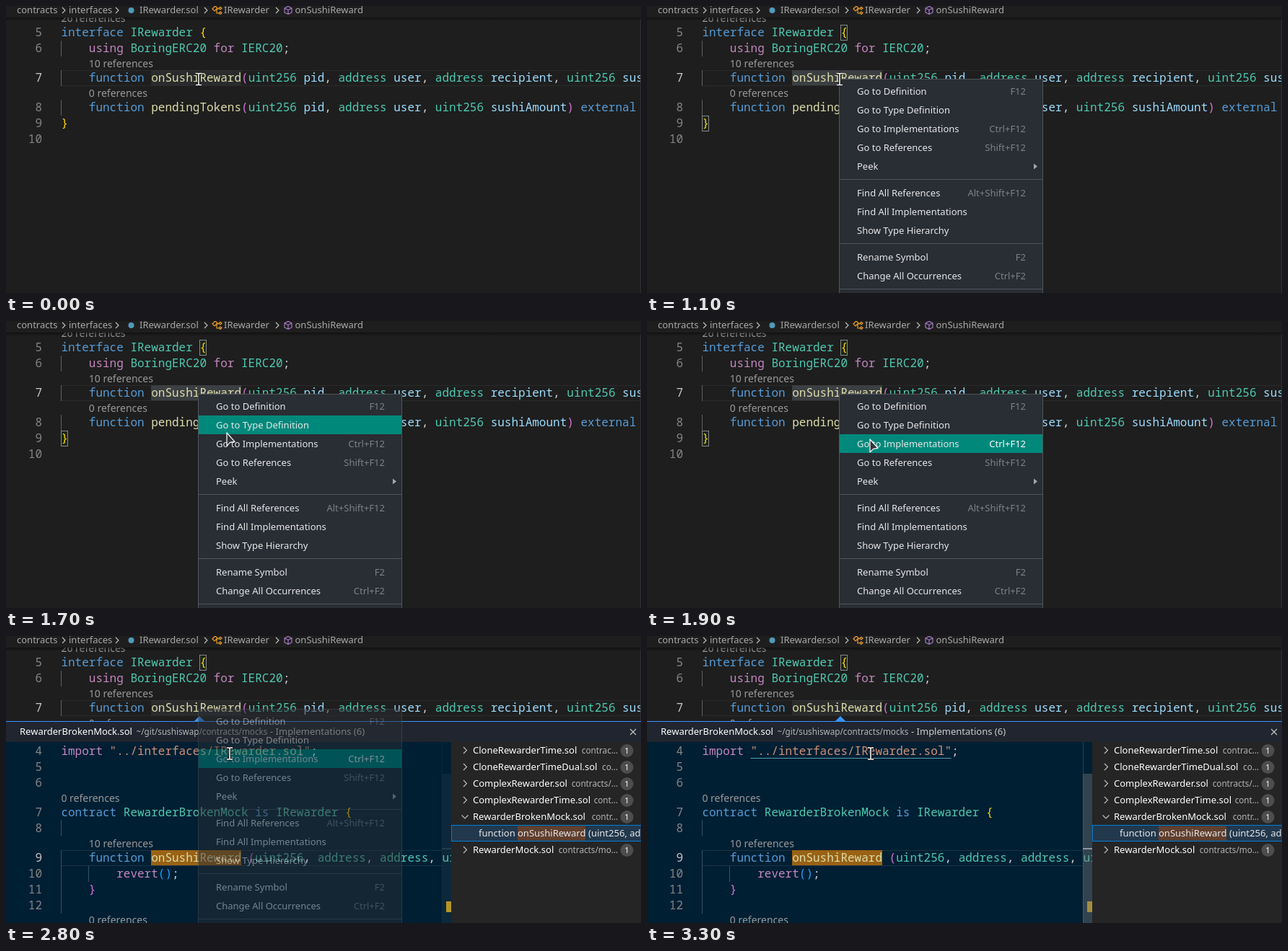
An HTML page that plays this animation: 880 by 398 pixels, repeating every 6 s.

```html
<!DOCTYPE html>
<html lang="en">
<head>
<meta charset="utf-8">
<title>Go to Implementations</title>
<style>
  html, body { margin: 0; width: 100%; height: 100%; overflow: hidden; background: #1e1e1e; }
  svg { display: block; width: 880px; height: 398px; }
  text { white-space: pre; font: 13px "Noto Sans", sans-serif; fill: #ccc; }
  .code { font: 16px "Noto Sans Mono", monospace; fill: #d4d4d4; }
  .num { text-anchor: end; fill: #858585; }
  .on { fill: #c6c6c6; }
  .lens { font-size: 14px; fill: #999; }
  .crumb { fill: #a9a9a9; }
  .small { font-size: 11.7px; fill: #b4b4b4; }
  .end { text-anchor: end; }
  .key { text-anchor: end; fill: #7f8387; }
  .item { fill: #e6e7e8; }
  .white { fill: #fff; }
  .badge { font-size: 11px; text-anchor: middle; fill: #fff; }
  .k { fill: #569cd6; } .t { fill: #4ec9b0; } .f { fill: #dcdcaa; } .v { fill: #9cdcfe; }
  .c { fill: #c586c0; } .s { fill: #ce9178; } .y { fill: #ffd700; } .p { fill: #da70d6; } .b { fill: #179fff; }
  .line { fill: none; stroke: #c5c5c5; stroke-width: 1.1; }
</style>
</head>
<body>
<svg id="stage" viewBox="0 0 880 398" xmlns="http://www.w3.org/2000/svg"></svg>
<script>
const CHAR = 9.6, LEFT = 76.4;

const rect = (x, y, w, h, fill, extra = '') =>
  `<rect x="${x}" y="${y}" width="${w}" height="${h}" fill="${fill}" ${extra}/>`;
const text = (x, y, cls, str) => `<text x="${x}" y="${y}" class="${cls}">${str}</text>`;
const path = (d, extra = 'class="line"') => `<path d="${d}" ${extra}/>`;
const chevron = (x, y, r = 4) => path(`M${x} ${y - r}l${r} ${r}l${-r} ${r}`);

// Tokens come as "class|text|class|text"; col is the indent in characters.
function code(num, y, col = 0, tokens = '', active = false) {
  const parts = tokens.split('|');
  let spans = '';
  for (let i = 0; i + 1 < parts.length; i += 2)
    spans += `<tspan class="${parts[i]}">${parts[i + 1]}</tspan>`;
  return text(50, y, 'code num' + (active ? ' on' : ''), num) +
    text(LEFT + col * CHAR, y, 'code', spans);
}
const lens = (y, str, col = 4) => text(LEFT + col * CHAR, y, 'lens', str);
const guide = (col, y, fill, h = 22) => rect(Math.floor(LEFT + col * CHAR), y, 1, h, fill);
const currentLine = (y, w, fill) => rect(76, y, w, 1, fill) + rect(76, y + 21, w, 1, fill);
const bracketBox = (id, x, y) =>
  `<rect id="${id}" x="${x}" y="${y}" width="9" height="21" fill="#1c251c" stroke="#888"/>`;

function breadcrumbs() {
  const cube = 'M391 .5l5 2.5v6l-5 2.5l-5-2.5v-6zM386 3l5 2.5l5-2.5M391 5.5v6';
  const shape = 'M286 4l4-4l3 3l-4 4zM291 4h4M292 4v6h3M295 3l2-1.5l2 1.5l-2 2zM295 9.5l2-1.5l2 1.5l-2 2z';
  return rect(0, 0, 880, 16, '#1e1e1e') +
    rect(0, 16, 880, 5, 'url(#shade)') +
    text(15, 10, 'crumb', 'contracts') + chevron(78, 6) +
    text(87, 10, 'crumb', 'interfaces') + chevron(152, 6) +
    '<circle cx="173.5" cy="6" r="4" fill="#519aba"/>' +
    text(185, 10, 'crumb', 'IRewarder.sol') + chevron(275, 6) +
    path(shape, 'fill="none" stroke="#ee9d28" stroke-width="1.2"') +
    text(302, 10, 'crumb', 'IRewarder') + chevron(374, 6) +
    path(cube, 'fill="none" stroke="#b180d7" stroke-width="1.1"') +
    text(400.5, 10, 'crumb', 'onSushiReward');
}

function editor() {
  const arg = (type, name) => `t|${type}|v| ${name}|x|, |`;
  const shared = arg('uint256', 'pid') + arg('address', 'user');
  return rect(0, 0, 880, 398, '#1e1e1e') +
    currentLine(89, 804, '#2b2b2b') +
    [48, 89, 130].map(y => guide(0, y, '#606060')).join('') +
    rect(201, 89, 125, 21, '#3c3f42', 'id="word"') +
    bracketBox('open', 268.5, 26.5) + bracketBox('close', 76.5, 152.5) +
    rect(268, 89, 10, 21, '#aeafad', 'id="block"') +
    lens(22, '26 references', 0) +
    code(5, 42, 0, 'k|interface |t|IRewarder |y|{') +
    code(6, 64, 4, 'c|using |t|BoringERC20 |c|for |t|IERC20|x|;') +
    lens(85, '10 references') +
    code(7, 105, 4, 'k|function |f|onSushiReward|p|(|' + shared +
      arg('address', 'recipient') + 't|uint256|v| sushiAmount', true) +
    text(LEFT + 20 * CHAR, 105, 'code', '<tspan id="blockChar" fill="#7a7a72">R</tspan>') +
    lens(126, '0 references') +
    code(8, 146, 4, 'k|function |f|pendingTokens|p|(|' + shared +
      't|uint256|v| sushiAmount|p|) |k|external') +
    code(9, 168, 0, 'y|}') + code(10, 190) +
    rect(879, 16, 1, 382, '#303030');
}

function results() {
  const rows = [
    ['CloneRewarderTime.sol', 'contrac…'], ['CloneRewarderTimeDual.sol', 'co…'],
    ['ComplexRewarder.sol', 'contracts/…'], ['ComplexRewarderTime.sol', 'cont…'],
    ['RewarderBrokenMock.sol', 'contr…'], null, ['RewarderMock.sol', 'contracts/mo…']
  ];
  return rect(617, 147, 263, 251, '#252526') + rows.map((row, i) => {
    const y = 158.5 + 23 * i;
    if (!row) return rect(617.5, y - 11, 264, 22, '#22384d', 'stroke="#007fd4"') +
      rect(709, y - 10, 94, 20, '#613f2e') +
      text(655, y + 4.5, 'item', 'function') + text(709, y + 4.5, 'item', 'onSushiReward') +
      text(807, y + 4.5, 'item', '(uint256, address)');
    const arrow = i === 4 ? path(`M631.5 ${y - 2}l4.5 4.5l4.5-4.5`) : chevron(634, y, 4.5);
    return arrow + text(647, y + 4.5, 'white', row[0]) + text(848, y + 4.5, 'small end', row[1]) +
      `<circle cx="860.5" cy="${y + .5}" r="9" fill="#4d4d4d"/>` + text(860.5, y + 4.5, 'badge', 1);
  }).join('');
}

function peek() {
  const dim = '#38505f';
  return path('M261 118l7-7l7 7z', 'fill="#3794ff"') +
    rect(0, 118, 880, 280, '#20252f') + rect(0, 118, 880, 1, '#3794ff') +
    text(19, 137, 'white', 'RewarderBrokenMock.sol') +
    text(180.5, 137, 'small', '~/git/sushiswap/contracts/mocks') +
    text(366, 137, '', '- Implementations (6)') +
    path('M865 129l8 8M873 129l-8 8') +
    rect(0, 147, 617, 251, '#001f33') +
    '<g clip-path="url(#peekClip)">' +
    currentLine(297, 528, '#1c3445') +
    [255, 297, 319, 341, 363].map(y => guide(0, y, dim)).join('') + guide(4, 319, dim) +
    rect(201, 297, 125, 21, '#996214') +
    code(4, 165, 0, 'c|import |s|"../interfaces/IRewarder.sol"|x|;') +
    rect(143.6, 169, 278, 1, '#4e9fb0', 'id="underline"') +
    code(5, 187) + code(6, 209) +
    lens(230, '0 references', 0) +
    code(7, 250, 0, 'k|contract |t|RewarderBrokenMock |k|is |t|IRewarder |y|{') +
    code(8, 272) +
    lens(293, '10 references') +
    code(9, 313, 4, 'k|function |f|onSushiReward |p|(|t|uint256|x|, |t|address|x|, |t|address|x|, |t|uint256', true) +
    code(10, 335, 8, 'c|revert|b|()|x|;') +
    code(11, 357, 4, 'p|}') + code(12, 379) +
    lens(399, '0 references') +
    rect(610, 368, 7, 15, '#bf9a1c') +
    '<g id="scroll">' + rect(604, 147, 1, 251, '#26404f') + rect(604, 191, 13, 207, '#79797966') +
    rect(604, 294, 13, 2, '#8d979d') + '</g></g>' +
    results();
}

const ROWS = [
  [118, 'Go to Definition', 'F12'], [144, 'Go to Type Definition', ''],
  [170, 'Go to Implementations', 'Ctrl+F12'], [196, 'Go to References', 'Shift+F12'],
  [222, 'Peek', ''], [259, 'Find All References', 'Alt+Shift+F12'],
  [285, 'Find All Implementations', ''], [311, 'Show Type Hierarchy', ''],
  [348, 'Rename Symbol', 'F2'], [374, 'Change All Occurrences', 'Ctrl+F2']
];

function menu() {
  return rect(266.5, 101.5, 282, 320, '#292d34', 'stroke="#50555b"') +
    rect(267, 105, 281, 26, '#00897b', 'id="hover"') +
    [240, 329, 392].map(y => rect(267, y, 281, 1, '#50555b')).join('') +
    ROWS.map(([y, label, key]) =>
      text(291, y + 4.5, 'item', label) + text(525, y + 4.5, 'key', key)).join('') +
    path('M536 218.5l5 4l-5 4z', 'fill="#a5a8ab"');
}

function pointers() {
  const beam = 'M-4-8h3q1 0 1 1v14q0 1-1 1h-3M4-8h-3q-1 0-1 1M4 8h-3q-1 0-1-1';
  return '<g id="beam" fill="none">' + path(beam, 'stroke="#111" stroke-width="3.4"') +
    path(beam, 'stroke="#fff" stroke-width="1.5"') + '</g>' +
    path('M0 0V18L4.6 13.4L11 12.4Z',
      'id="arrow" fill="#31363b" stroke="#fff" stroke-width="1.2" stroke-linejoin="round"');
}

const stage = document.getElementById('stage');
stage.innerHTML =
  `<defs><linearGradient id="shade" x2="0" y2="1"><stop stop-color="#000" stop-opacity=".45"/>
   <stop offset="1" stop-color="#000" stop-opacity="0"/></linearGradient>
   <clipPath id="peekClip"><rect y="147" width="617" height="251"/></clipPath></defs>` +
  editor() + breadcrumbs() + `<g id="peek">${peek()}</g><g id="menu">${menu()}</g>` + pointers();

const el = id => document.getElementById(id);
const fade = (id, amount) => el(id).setAttribute('opacity', Number(amount));
const move = (id, x, y) => el(id).setAttribute('transform', `translate(${x} ${y})`);
const keys = [...stage.querySelectorAll('#menu .key')];

// Pointer path through the menu, one point per 100 ms.
const trail = [[279, 113], [288, 127], [299, 144], [306, 155], [308, 161], [309, 164]];

function draw(time) {
  const t = Math.floor(time % 6000 / 100) * 100;
  const inMenu = t >= 1400 && t < 2800;
  const peeking = t >= 2800;
  const [x, y] = trail[Math.max(0, Math.min(5, (t - 1400) / 100))];
  const row = y < 131 ? 0 : y < 157 ? 1 : 2;

  fade('word', t < 900 || peeking ? .4 : 1);
  fade('open', t >= 900);
  fade('close', t >= 900);
  fade('block', t >= 900 && t < 1100);
  fade('blockChar', t >= 900 && t < 1100);

  fade('menu', t === 1000 || t === 2800 ? .5 : t > 1000 && t < 2800);
  fade('hover', t >= 1400);
  el('hover').setAttribute('y', 105 + 26 * row);
  keys.forEach((key, i) => key.style.fill = t >= 1400 && i === row ? '#fff' : '');

  fade('peek', peeking);
  fade('underline', t >= 3000);
  fade('scroll', Math.min(1, Math.max(0, .25 + (t - 2800) / 650)));

  fade('beam', !inMenu);
  fade('arrow', inMenu);
  move('beam', peeking ? 310 : 267, peeking ? 163 : 101.5);
  move('arrow', x, y);
}

function tick() {
  draw(performance.now());
  requestAnimationFrame(tick);
}
tick();
</script>
</body>
</html>
```
